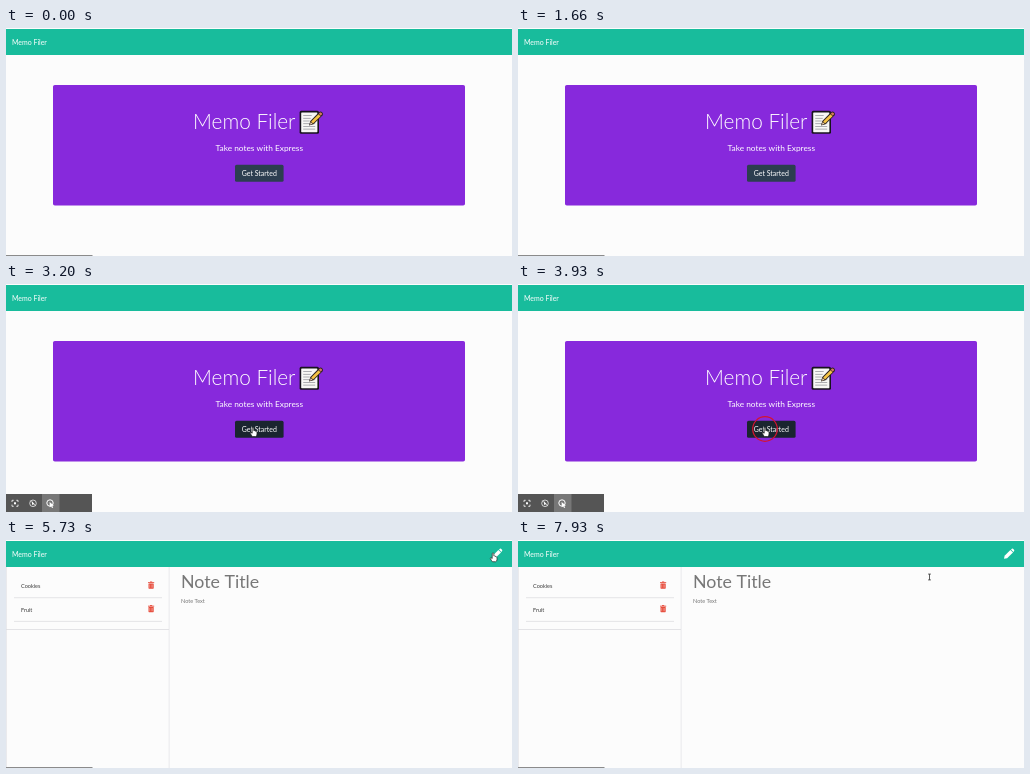
An HTML page with a canvas that plays this animation: 506 px wide and 228 px high, repeating every 8 s.

```html
<!DOCTYPE html>
<html lang="en">
<head>
<meta charset="utf-8">
<title>Memo Filer</title>
<style>
html, body { margin: 0; width: 100%; height: 100%; overflow: hidden; background: #fcfcfc; }
canvas { display: block; width: 506px; height: 228px; }
</style>
</head>
<body>
<canvas id="stage"></canvas>
<script>
const W = 506, H = 228, LOOP = 8000;
const canvas = document.getElementById('stage');
const ctx = canvas.getContext('2d');
const dpr = window.devicePixelRatio || 1;
canvas.width = W * dpr;
canvas.height = H * dpr;

const APP = 'Memo Filer';
const T = { cursor: 2400, tools: 2660, hover: 3120, press: 3740, release: 4130,
            page: 4200, notes: 4730, press2: 7250, release2: 7600 };

// Cursor path: time, x, y of the pointer tip
const PATH = [
  [2400, 229, 205], [2530, 233, 180.5], [2760, 236, 172], [3200, 247, 143.5],
  [5000, 247, 143.5], [5750, 487.5, 12.5], [7600, 487.5, 12.5], [7870, 411.5, 37]
];

function rect(x, y, w, h, color) {
  ctx.fillStyle = color;
  ctx.fillRect(x, y, w, h);
}

function round(x, y, w, h, r, color) {
  ctx.fillStyle = color;
  ctx.beginPath();
  ctx.roundRect(x, y, w, h, r);
  ctx.fill();
}

function text(str, x, y, size, color, align = 'left', weight = 400) {
  ctx.font = `${weight} ${size}px Lato, sans-serif`;
  ctx.fillStyle = color;
  ctx.textAlign = align;
  ctx.fillText(str, x, y);
}

function shape(d, fill, stroke, width = 1) {
  const p = new Path2D(d);
  if (fill) { ctx.fillStyle = fill; ctx.fill(p); }
  if (stroke) { ctx.strokeStyle = stroke; ctx.lineWidth = width; ctx.stroke(p); }
}

function at(x, y, draw) {
  ctx.save();
  ctx.translate(x, y);
  draw();
  ctx.restore();
}

function ring(x, y, r, color, width) {
  ctx.beginPath();
  ctx.arc(x, y, r, 0, Math.PI * 2);
  ctx.strokeStyle = color;
  ctx.lineWidth = width;
  ctx.stroke();
}

function navbar() {
  rect(0, 0, W, H, '#fcfcfc');
  rect(0, 1, W, 26, '#18bc9c');
  text(APP, 6, 17, 6.96, '#fff');
}

function memo() {
  at(293, 82, () => {
    round(0.6, 0.8, 19.4, 23, 1.6, '#17131c');
    round(2.2, 2.4, 16.2, 19.8, 0.6, '#f7f7f5');
    for (let i = 0; i < 6; i++) {
      rect(4.2, 5.2 + i * 2.7, i < 3 ? 8.5 - i : 12, 0.8, '#9a9aa0');
    }
    shape('M10 15.5 L11.3 11 L20 2.2 Q21.6 .8 23.2 2.3 Q24.8 4 23.4 5.5 L14.5 14.2 Z', '#2b211d');
    shape('M12.2 11.6 L19.5 4.2 L21.5 6.2 L14 13.4 Z', '#f6c445');
    shape('M19.8 3.8 L21 2.6 Q21.8 2.1 22.6 2.9 Q23.4 3.8 22.8 4.6 L21.7 5.8 Z', '#d8775f');
    shape('M10.8 14.7 L11.8 12 L13.5 13.8 Z', '#f0d3ab');
  });
}

function home(t) {
  round(47, 57, 412, 120.6, 1.8, '#8729dc');
  text(APP, 187, 101.3, 20.8, '#fff', 'left', 300);
  memo();
  text('Take notes with Express', 253.3, 122.5, 8.35, '#fff', 'center');
  round(229, 136.8, 48.6, 17, 1.6, t >= T.hover ? '#1a252f' : '#2c3e50');
  text('Get Started', 253.3, 147.7, 6.96, '#fff', 'center');
}

function pencil() {
  shape('M486 18.8 L486.6 15.8 L492.4 10 L495 12.6 L489.1 18.3 Z', '#fff');
  shape('M493 9.5 L493.9 8.7 Q494.4 8.3 495 8.8 L496 9.8 Q496.6 10.4 496.1 11 L495.4 11.9 Z', '#fff');
}

function trash(y) {
  at(142, y, () => {
    rect(0, 0.7, 6.2, 0.9, '#e74c3c');
    rect(2, 0, 2.2, 0.9, '#e74c3c');
    round(0.5, 2, 5.2, 5.2, 0.6, '#e74c3c');
    for (const x of [1.6, 2.9, 4.2]) rect(x, 3, 0.4, 3.2, '#f8c4be');
  });
}

function note(name, y) {
  text(name, 15, y + 6.8, 5.56, '#3b3b3b');
  trash(y);
  rect(8, y + 15.9, 148, 0.8, '#dedee2');
}

function editor(t) {
  const line = '#e3e3e7';
  rect(0, 27, 0.7, 201, line);
  rect(162.7, 27, 0.8, 201, line);
  if (t < T.notes) {
    rect(0, 41.8, 163, 0.8, line);
  } else {
    note('Cookies', 41.5);
    note('Fruit', 65);
    rect(0, 89, 163, 0.8, '#dedee2');
  }
  text('Note Title', 175, 48.2, 17.8, '#777');
  text('Note Text', 175, 62.7, 5.56, '#777');
  pencil();
}

function toolbar(t) {
  if (t < T.tools || t >= T.page) {
    rect(0, 227, 86.5, 1, '#8b8b8b');
    return;
  }
  rect(0, 210, 86, 18, '#555');
  rect(36, 210, 17.5, 18, '#777');
  at(9, 219.3, () => {
    shape('M-3 -1.3V-3H-1.3 M1.3 -3H3V-1.3 M3 1.3V3H1.3 M-1.3 3H-3V1.3', null, '#fff', 0.8);
    rect(-1, -1, 2, 2, '#fff');
  });
  at(27, 219.3, () => {
    ring(0, 0, 3.3, '#eee', 0.8);
    shape('M-1 -2 V2 L0 1 L2 1.2 Z', '#fff');
    shape('M-2.6 -2.6 L2.8 2.8', null, '#eee', 0.7);
  });
  at(44, 219, () => {
    ring(0, 0, 3.2, '#fff', 1);
    shape('M-.4 -1 L3.9 2.5 L2.2 2.8 L3.2 4.5 L2 5 L1.2 3.2 L-.2 4.3 Z', '#fff');
  });
}

function cursorAt(t) {
  let i = 0;
  while (i < PATH.length - 2 && t >= PATH[i + 1][0]) i++;
  const [t0, x0, y0] = PATH[i], [t1, x1, y1] = PATH[i + 1];
  const k = Math.min(1, Math.max(0, (t - t0) / (t1 - t0)));
  const e = k * k * (3 - 2 * k);
  return [x0 + (x1 - x0) * e, y0 + (y1 - y0) * e];
}

const ARROW = 'M0 0 V6.2 L1.4 5 L2.4 7 L3.4 6.5 L2.5 4.6 L4.3 4.5 Z';
const HAND = 'M-.8 .6 Q0 -.4 .8 .6 V3.2 Q1.7 2.8 2 3.6 Q3 3.3 3.3 4.2 Q4 4.2 4 5 ' +
  'V6.5 Q4 8.6 2.6 9 H-.6 Q-1.5 8 -2.9 5.6 Q-2.6 4.3 -.8 5.7 Z';
const BEAM = 'M-1.4 -2.9 H1.4 M0 -2.9 V2.9 M-1.4 2.9 H1.4';

function cursor(t) {
  if (t < T.cursor) return;
  const [x, y] = cursorAt(t);
  const overButton = t >= T.hover && t < 5060;
  const overPencil = x > 484 && y < 20;
  at(x, y, () => {
    if (overButton || overPencil) shape(HAND, '#fff', '#222', 0.7);
    else if (t > T.release2 && y > 27) shape(BEAM, null, '#333', 0.8);
    else shape(ARROW, '#fff', '#222', 0.7);
  });
}

function click(t) {
  if (t >= T.press && t < T.release) ring(247, 145, 12.3, '#d5142f', 1.2);
  if (t >= T.press2 && t < T.release2) ring(488, 14.5, 12.3, '#d5142f', 1.2);
}

function frame(now) {
  const t = now % LOOP;
  ctx.setTransform(dpr, 0, 0, dpr, 0, 0);
  navbar();
  if (t < T.page) home(t);
  else editor(t);
  toolbar(t);
  click(t);
  cursor(t);
}

const start = performance.now();
function tick() {
  frame(performance.now() - start);
  requestAnimationFrame(tick);
}
tick();
</script>
</body>
</html>
```
